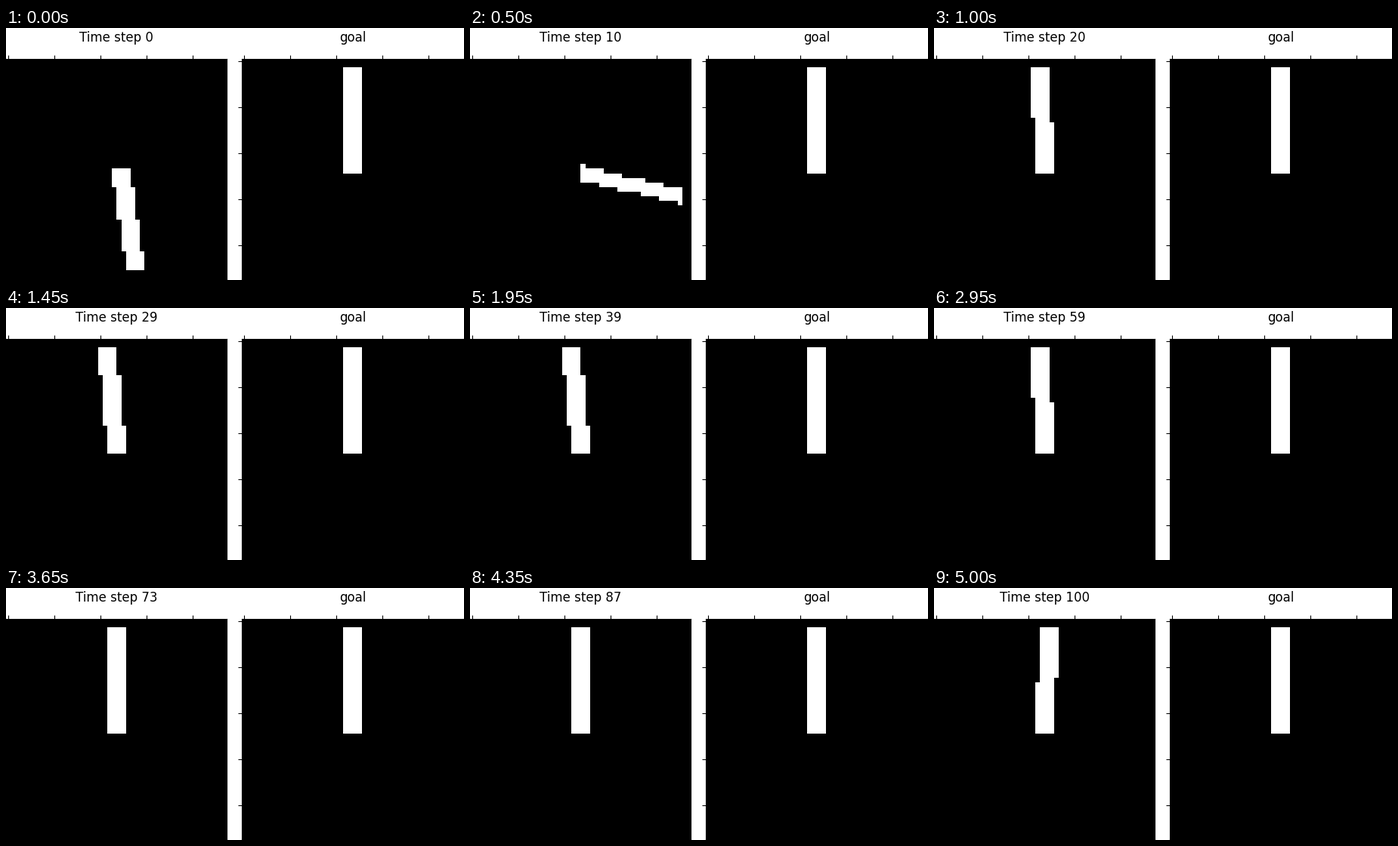
These frames come from a looping animation (606 by 334 pixels, 5050 ms). A matplotlib script:

```python
import math

import matplotlib.pyplot as plt
import numpy as np
from matplotlib.animation import FuncAnimation

W, H, DPI = 606, 334, 100
GRID, PIVOT, ROD, THICK = 48, 24, 22, 4
STEPS, INTERVAL = 101, 50
SIDE, BOTTOM = 292.45, 0.7

# Balancing phase: (step, angle from upright in radians)
SWAY = [(11, 1.634), (15, .88), (18, .3), (20, -.03), (22, -.2), (24, -.3),
        (27, -.2), (30, 0), (33, .2), (36, .05), (39, -.068), (42, .004),
        (44, .03), (47, .07), (50, .02), (53, .06), (55, .03), (57, -.06),
        (59, -.03), (61, .05), (63, -.03), (66, .02), (69, .06), (73, .02),
        (77, .06), (79, .1), (82, -.03), (84, .1), (88, .02), (91, -.03),
        (94, .03), (97, -.02), (99, .06), (100, .06)]


def angle(step):
    if step <= 11:
        return 2.98 - .052 * step - .0064 * step ** 2
    return np.interp(step, *zip(*SWAY))


def round_up(v):
    return int(math.copysign(math.floor(abs(v) + .5), v))


def round_down(v):
    return int(math.copysign(math.ceil(abs(v) - .5), v))


def rod_corners(theta):
    """Whole-pixel corners of a thick line from the pivot to the tip."""
    x0 = y0 = PIVOT
    x1 = math.floor(x0 + ROD * math.sin(theta))
    y1 = math.floor(y0 - ROD * math.cos(theta))
    dx, dy = x1 - x0, y1 - y0
    length = math.hypot(dx, dy)
    near, far = (THICK // 2 - 1) / length, THICK // 2 / length
    ax, bx = round_down(near * dy), round_down(far * dy)
    ay, by = round_up(near * dx), round_up(far * dx)
    return [(x0 - ax, y0 + by), (x1 - ax, y1 + by),
            (x1 + bx, y1 - ay), (x0 + bx, y0 - ay)]


def draw_rod(theta):
    """Fill the rod row by row on the coarse grid."""
    img = np.zeros((GRID, GRID))
    pts = rod_corners(theta)
    edges = list(zip(pts, pts[1:] + pts[:1]))
    ys = [y for _, y in pts]
    for y in range(min(ys), max(ys) + 1):
        xs = []
        for (xa, ya), (xb, yb) in edges:
            if ya == yb == y:
                xs += [xa, xb]
            elif ya != yb and min(ya, yb) <= y <= max(ya, yb):
                xs.append(xa + (xb - xa) * (y - ya) / (yb - ya))
        left = math.floor(min(xs) + .5)
        right = math.ceil(max(xs) - .5)
        img[y, left:right + 1] = 1
    return img


fig = plt.figure(figsize=(W / DPI, H / DPI), dpi=DPI, facecolor="white")


def panel(x, title, theta):
    ax = fig.add_axes([x / W, BOTTOM / H, SIDE / W, SIDE / H])
    image = ax.imshow(draw_rod(theta), cmap="gray", vmin=0, vmax=1,
                      interpolation="nearest", aspect="auto")
    ticks = range(0, GRID, 10)
    ax.set_xticks(ticks)
    ax.set_yticks(ticks)
    ax.tick_params(top=True, bottom=False, labelbottom=False, labelleft=False)
    label = fig.text((x + SIDE / 2) / W, 316.05 / H, title, fontsize=12,
                     family="DejaVu Sans", ha="center", va="baseline")
    return image, label


rod, caption = panel(0, "Time step 0", angle(0))
panel(312.4, "goal", 0)


def update(step):
    rod.set_data(draw_rod(angle(step)))
    caption.set_text(f"Time step {step}")
    return rod, caption


anim = FuncAnimation(fig, update, frames=STEPS, interval=INTERVAL,
                     repeat=True, repeat_delay=0, blit=False)
plt.show()
```
